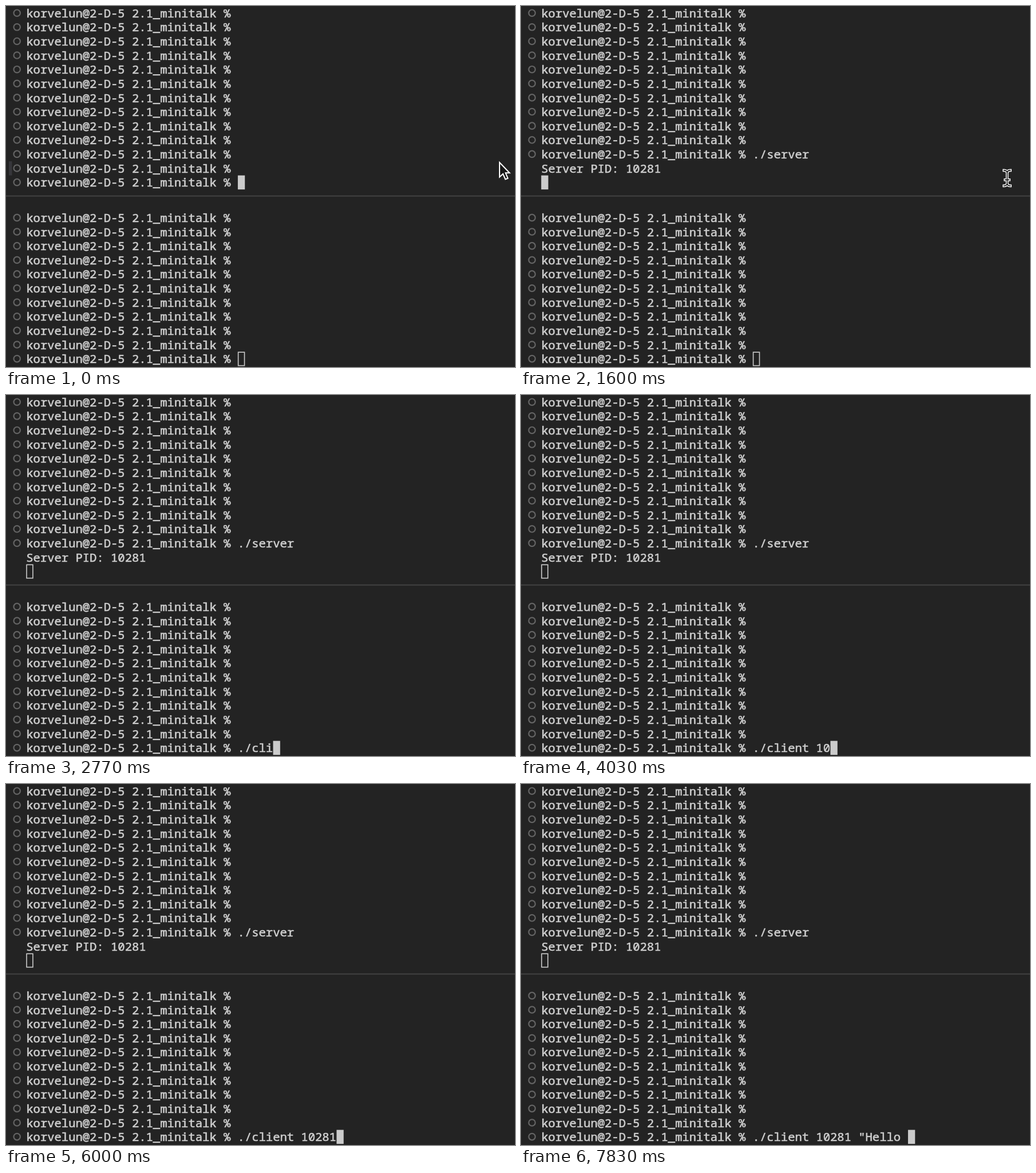
These frames come from a looping animation (889 px wide and 630 px high, 8 s). An HTML page with a canvas:

```html
<!DOCTYPE html>
<html lang="en">
<head>
<meta charset="utf-8">
<title>Client and server terminals</title>
<style>
  html, body { margin: 0; width: 100%; height: 100%; overflow: hidden; background: #232323; }
  canvas { display: block; }
</style>
</head>
<body>
<canvas id="stage" width="889" height="630"></canvas>
<script>
const ctx = document.getElementById('stage').getContext('2d');
const LOOP = 8000;
const COL = 12.32, ROW = 24.62, LEFT = 35.3;
const TOP = 12.2, BOTTOM = 369.4;   // centre of each pane's first row
const PROMPT = 'korvelun@2-D-5 2.1_minitalk % ';

const SERVER = './server';
const SERVER_KEYS = [130, 300, 430, 530, 600, 700, 830, 930];
const ENTER = 1200;

const CLIENT = './client 10281 "Hello ';
const CLIENT_KEYS = [2200, 2370, 2570, 2670, 2770, 2870, 2970, 3070, 3270, 3730, 4000,
  4600, 5070, 5400, 6070, 6270, 6570, 6730, 6800, 6900, 7500, 7830];

const MOVE_START = 1600, MOVE_END = 1800, CLICK = 1830;

const typed = (text, keys, t) => text.slice(0, keys.filter(k => k <= t).length);

// A fine outline gives the regular face a medium weight.
function drawText(text, y) {
  ctx.fillStyle = ctx.strokeStyle = '#cfcfcf';
  ctx.lineWidth = 0.6;
  ctx.lineJoin = 'round';
  ctx.fillText(text, LEFT, y + 7.6);
  ctx.strokeText(text, LEFT, y + 7.6);
}

function drawPrompt(y, command = '') {
  ctx.strokeStyle = '#646464';
  ctx.lineWidth = 2.2;
  ctx.beginPath();
  ctx.arc(19.2, y, 5.7, 0, Math.PI * 2);
  ctx.stroke();
  drawText(PROMPT + command, y);
}

function drawCursor(column, y, focused) {
  const x = LEFT + column * COL;
  if (focused) {
    ctx.fillStyle = '#cbcbcb';
    ctx.fillRect(x, y - 12, COL, 24.5);
  } else {
    ctx.strokeStyle = '#cbcbcb';
    ctx.lineWidth = 1.6;
    ctx.lineJoin = 'miter';
    ctx.strokeRect(x + 0.7, y - 11.4, COL - 1.4, 23.4);
  }
}

function drawHoverBar(y) {
  ctx.fillStyle = '#37373b';
  ctx.fillRect(5, y - 12, 5.5, ROW);
}

function drawArrow(x, y) {
  ctx.save();
  ctx.translate(x, y);
  const shape = new Path2D('M1 2V27.5L7 22L11.2 31.5L15.5 29.7L11.5 20.3H18.5Z');
  ctx.fillStyle = '#161616';
  ctx.strokeStyle = '#fff';
  ctx.lineWidth = 2;
  ctx.fill(shape);
  ctx.stroke(shape);
  ctx.restore();
}

function drawBeam(x, y) {
  ctx.save();
  ctx.translate(x, y);
  const shape = new Path2D('M-5.5 -13.5Q0 -13.5 0 -9Q0 -13.5 5.5 -13.5' +
    'M0 -9V9M-5.5 13.5Q0 13.5 0 9Q0 13.5 5.5 13.5M-3.5 3H3.5');
  ctx.lineCap = 'square';
  for (const [color, width] of [['#fff', 4.6], ['#161616', 1.6]]) {
    ctx.strokeStyle = color;
    ctx.lineWidth = width;
    ctx.stroke(shape);
  }
  ctx.restore();
}

function drawServerPane(t) {
  const rowY = i => TOP + i * ROW;
  const started = t >= ENTER;
  const command = typed(SERVER, SERVER_KEYS, t);
  const last = started ? 10 : 12;
  for (let i = 0; i < last; i++) drawPrompt(rowY(i));
  drawPrompt(rowY(last), command);
  if (started) drawText('Server PID: 10281', rowY(11));
  drawCursor(started ? 0 : PROMPT.length + command.length, rowY(12), t < CLICK);
}

function drawClientPane(t) {
  const rowY = i => BOTTOM + i * ROW;
  const command = typed(CLIENT, CLIENT_KEYS, t);
  for (let i = 0; i < 10; i++) drawPrompt(rowY(i));
  drawPrompt(rowY(10), command);
  drawCursor(PROMPT.length + command.length, rowY(10), t >= CLICK);
}

function drawPointer(t) {
  if (t < SERVER_KEYS[0]) {
    drawHoverBar(TOP + 11 * ROW);
    drawArrow(861, 271);
  } else if (t >= MOVE_START && t < CLIENT_KEYS[0]) {
    const p = Math.min(1, (t - MOVE_START) / (MOVE_END - MOVE_START));
    const ease = 1 - (1 - p) ** 2;
    const x = 850 - 92 * ease, y = 299 + 133 * ease;
    const row = Math.round((y - BOTTOM) / ROW);
    if (row >= 0) drawHoverBar(BOTTOM + row * ROW);
    drawBeam(x, y);
  }
}

function draw(t) {
  ctx.fillStyle = '#232323';
  ctx.fillRect(0, 0, 889, 630);
  ctx.font = '20.53px "Noto Sans Mono", "DejaVu Sans Mono", monospace';
  ctx.fillStyle = '#474747';
  ctx.fillRect(0, 330.7, 889, 1.7);
  drawServerPane(t);
  drawClientPane(t);
  drawPointer(t);
}

const start = performance.now();
function frame() {
  draw((performance.now() - start) % LOOP);
  requestAnimationFrame(frame);
}
frame();
</script>
</body>
</html>
```
